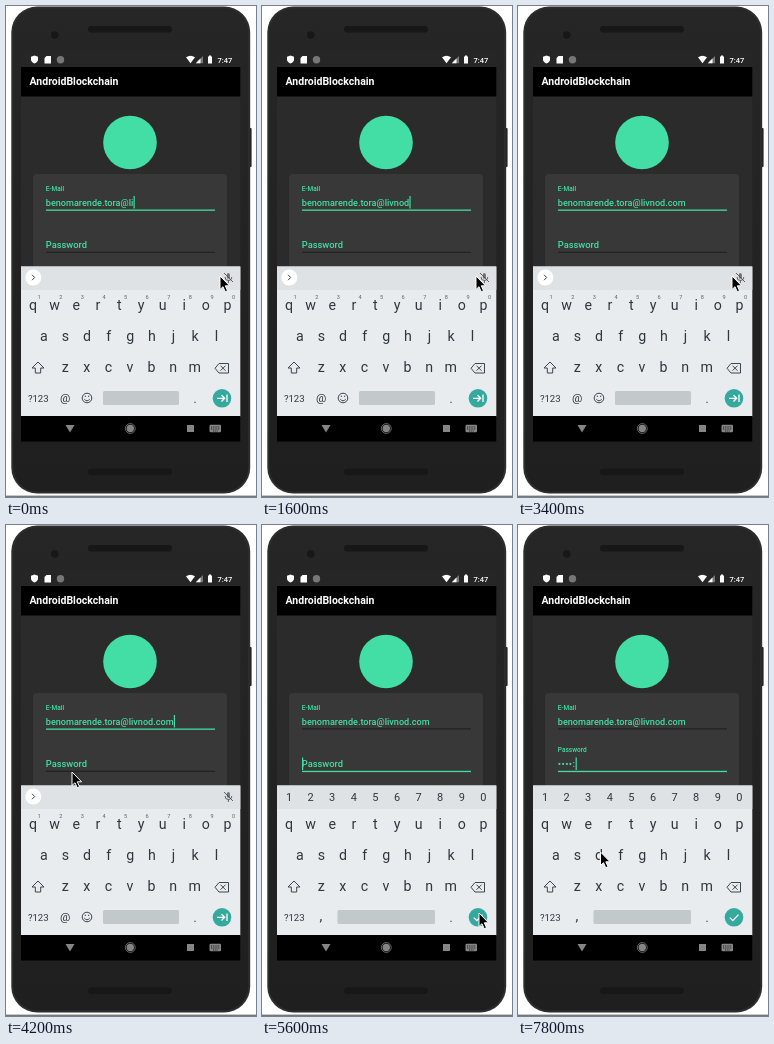
These frames come from a looping animation (250 px wide and 491 px high, 8 s). An HTML page:

```html
<!DOCTYPE html>
<html lang="en">
<head>
<meta charset="utf-8">
<title>Login form</title>
<style>
  html, body { margin: 0; width: 100%; height: 100%; overflow: hidden; background: #fff; }
  svg { display: block; width: 100%; height: 100%; }
  text { font-family: Roboto, sans-serif; white-space: pre; }
  .accent { fill: #43dea5; }
  text.accent { font-weight: 500; }
  .key { fill: #30373b; text-anchor: middle; font-size: 14.2px; }
  .hint { fill: #596266; text-anchor: middle; font-size: 5.6px; }
  .line { fill: none; stroke: #3c4549; stroke-width: 1; stroke-linejoin: round; }
  .white { fill: none; stroke: #fff; stroke-width: 1.3; }
</style>
</head>
<body>
<svg viewBox="0 0 250 491">
  <defs>
    <linearGradient id="shell" x2="0" y2="1">
      <stop offset="0" stop-color="#262626"/>
      <stop offset="1" stop-color="#1f1f1f"/>
    </linearGradient>
  </defs>
  <rect width="250" height="491" fill="#fff"/>
  <rect y="489.6" width="250" height="1.4" fill="#777"/>

  <!-- phone -->
  <rect x="242" y="122" width="3.6" height="39" rx="1" fill="#222"/>
  <rect x="5.3" y=".5" width="238.9" height="487" rx="26" fill="#2d2d2d"/>
  <rect x="7.3" y="2.500" width="234.9" height="483" rx="24" fill="url(#shell)"/>
  <circle cx="48.8" cy="29" r="3.8" fill="#171717"/>
  <rect x="82" y="20" width="84" height="6.5" rx="3" fill="#171717"/>
  <rect x="82" y="462.5" width="84" height="6.5" rx="3" fill="#171717"/>

  <!-- app -->
  <rect x="15" y="46" width="219.3" height="389" fill="#2b2b2b"/>
  <rect x="15" y="46" width="219.3" height="15" fill="#262626"/>
  <rect x="15" y="61" width="219.3" height="29.5" fill="#000"/>
  <g fill="#fff">
    <path d="M28.5 49.5l3.5 1.3v2.8q0 2.6-3.5 4-3.5-1.4-3.5-4v-2.8z"/>
    <path d="M40.5 50h4.5v7.5h-6.5v-5.5z"/>
    <circle cx="54.5" cy="53.7" r="3.7" fill="#777"/>
    <path d="M180 51.3q4.5-3 9 0l-4.500 5.9z"/>
    <path d="M197 50v7.2h-7.2z" fill="#777"/>
    <path d="M194.500 52.5v4.7h-4.7z"/>
    <path d="M202 50.4h1v-1h2v1h1v7h-4z"/>
    <text x="211.6" y="56.600" font-size="7.5" font-weight="500">7:47</text>
    <text x="23.500" y="79.400" font-size="10.5" font-weight="700">AndroidBlockchain</text>
  </g>
  <circle class="accent" cx="124" cy="136.500" r="26.8"/>
  <rect x="27" y="168" width="194" height="100" rx="4" fill="#383838"/>
  <text class="accent" x="39.8" y="185" font-size="6.5">E-Mail</text>
  <text class="accent" id="mail" x="39.8" y="200" font-size="9.1"></text>
  <rect id="mailLine" x="40" width="169"/>
  <text class="accent" id="label" x="39.8">Password</text>
  <text class="accent" id="pass" x="39.8" y="242" font-size="9.4" letter-spacing=".4"></text>
  <rect id="passLine" x="40" width="169"/>
  <rect class="accent" id="caret" width="1.2" height="12.5"/>

  <!-- keyboard -->
  <rect x="15" y="260.5" width="219.3" height="150" fill="#e8ecef"/>
  <rect x="15" y="260.5" width="219.3" height="23.5" fill="#dee2e5"/>
  <g id="letters"></g>
  <path class="line" d="M32 356l6 6h-3.300v5h-5.400v-5h-3.300z"/>
  <path class="line" d="M213 357.500h9.500v9.500h-9.500l-4-4.750zM214.500 359.700l5 5m0-5l-5 5"/>
  <text class="key" x="32.300" y="395.500" style="font-size:9.600px">?123</text>
  <text class="key" x="189" y="396.500" style="font-size:12px">.</text>
  <rect id="space" y="385" height="14" rx="1.5" fill="#c3c8cb"/>
  <circle cx="216" cy="392.300" r="9.3" fill="#36a99e"/>
  <g id="mailKeys">
    <circle cx="27.300" cy="271.500" r="8" fill="#fff"/>
    <path class="line" d="M26 268.800l2.700 2.700-2.700 2.700"/>
    <rect x="220.900" y="267" width="3" height="5.800" rx="1.5" fill="#70777a"/>
    <path class="line" stroke-opacity=".8" d="M219 271q0 3.500 3.400 3.500t3.400-3.500M222.400 274.500v2.500M218 267l9 9"/>
    <text class="key" x="59.200" y="396" style="font-size:11.500px">@</text>
    <circle class="line" cx="81" cy="392" r="4.800"/>
    <path class="line" d="M78.300 393.200q2.700 3.200 5.400 0M79.300 389.700v1.300M82.700 389.700v1.300"/>
    <path class="white" d="M211 392.300h7.500m-3-3.200l3.200 3.200-3.200 3.200M221 388.500v7.600"/>
  </g>
  <g id="passKeys">
    <text class="key" x="59" y="396">,</text>
    <path class="white" d="M211.800 392.600l3 3 5.700-6"/>
  </g>

  <!-- navigation bar -->
  <rect x="15" y="410" width="219.3" height="25.500" fill="#000"/>
  <g fill="#858585">
    <path d="M59.500 419h9l-4.500 7.500z"/>
    <circle cx="124.300" cy="422.500" r="3.700"/>
    <circle cx="124.300" cy="422.500" r="4.900" fill="none" stroke="#858585" stroke-width=".8"/>
    <rect x="181" y="419" width="7" height="7"/>
    <rect x="203.500" y="418.800" width="11.500" height="7.500" rx="1"/>
    <path d="M205 421h8.500M205 423h8.500M207 425h4.500" stroke="#000" stroke-width=".8" stroke-dasharray="1 .8"/>
  </g>

  <path id="mouse" d="M0 0v13.500l3-2.800 2.200 5 2.300-1-2.200-4.900h4.300z" fill="#000" stroke="#fff" stroke-width="1"/>
</svg>
<script>
const LOOP = 8000, STEP = 200;
const SWITCH = 5600;              // focus moves to the password field
const ADDRESS = "benomarende.tora@livnod.com";
const mailTimes = [400, 800, 1200, 1600, 2000, 2200, 2600, 2800];
const passTimes = [6600, 7000, 7400, 7600, 7800];
const path = [                    // time, x, y of the pointer tip
  [3400, 214, 270], [3600, 140, 258], [3800, 72, 247], [4200, 66, 247],
  [4600, 66, 247], [4800, 165, 335], [5000, 205.5, 368.5], [5200, 217, 388],
  [5600, 217, 388], [5800, 175, 366], [6000, 100, 332], [6200, 82.5, 327]
];

const $ = id => document.getElementById(id);
const set = (id, attrs) => {
  for (const k in attrs) $(id).setAttribute(k, attrs[k]);
};
const show = (id, on) => set(id, { visibility: on ? "visible" : "hidden" });
const mix = (a, b, k) => a + (b - a) * k;
const clamp = k => Math.max(0, Math.min(1, k));

function addKeys(parent, chars, x, y, cls, size) {
  [...chars].forEach((ch, i) => {
    const t = document.createElementNS("http://www.w3.org/2000/svg", "text");
    t.setAttribute("class", cls);
    t.setAttribute("x", x + i * 21.6);
    t.setAttribute("y", y);
    if (size) t.style.fontSize = size + "px";
    t.textContent = ch;
    $(parent).append(t);
  });
}
addKeys("letters", "qwertyuiop", 27, 304, "key");
addKeys("letters", "asdfghjkl", 37.8, 335, "key");
addKeys("letters", "zxcvbnm", 59.2, 366, "key");
addKeys("mailKeys", "1234567890", 33.2, 293, "hint");
addKeys("passKeys", "1234567890", 27, 276, "key", 11);

function pointer(t) {
  if (t <= path[0][0]) return path[0].slice(1);
  const i = path.findIndex(p => p[0] >= t);
  if (i < 0) return path[path.length - 1].slice(1);
  const [t0, x0, y0] = path[i - 1], [t1, x1, y1] = path[i];
  const k = (t - t0) / (t1 - t0);
  return [mix(x0, x1, k), mix(y0, y1, k)];
}

function underline(id, y, active) {
  set(id, { y, height: active ? 1.3 : 0.8, fill: active ? "#43dea5" : "#161616" });
}

function draw(t) {
  const inPass = t >= SWITCH;
  const pressed = times => times.filter(k => k <= t);
  const typed = pressed(mailTimes), secret = pressed(passTimes);
  const n = secret.length;

  $("mail").textContent = ADDRESS.slice(0, ADDRESS.length - mailTimes.length + typed.length);
  $("pass").textContent = n ? "•".repeat(n - 1) + ":" : "";
  underline("mailLine", 203.5, !inPass);
  underline("passLine", 245.8, inPass);

  const lift = clamp((t - SWITCH) / 200);
  set("label", { y: mix(241.5, 227.3, lift), "font-size": mix(9.3, 6.5, lift) });

  // the caret restarts its blink at every key and focus change
  const last = inPass ? Math.max(SWITCH, ...secret) : Math.max(0, ...typed);
  const field = $(inPass ? "pass" : "mail");
  const width = field.textContent ? field.getComputedTextLength() : 0;
  set("caret", { x: 40 + width, y: inPass ? 232.5 : 190 });
  show("caret", (t - last) % 1000 < 500);

  show("mailKeys", !inPass);
  show("passKeys", inPass);
  set("space", inPass ? { x: 75.5, width: 97.5 } : { x: 97, width: 76 });
  set("mouse", { transform: `translate(${pointer(t)})` });
}

const start = performance.now();
function tick() {
  const t = (performance.now() - start) % LOOP;
  draw(Math.floor(t / STEP) * STEP);
  requestAnimationFrame(tick);
}
tick();
</script>
</body>
</html>
```
